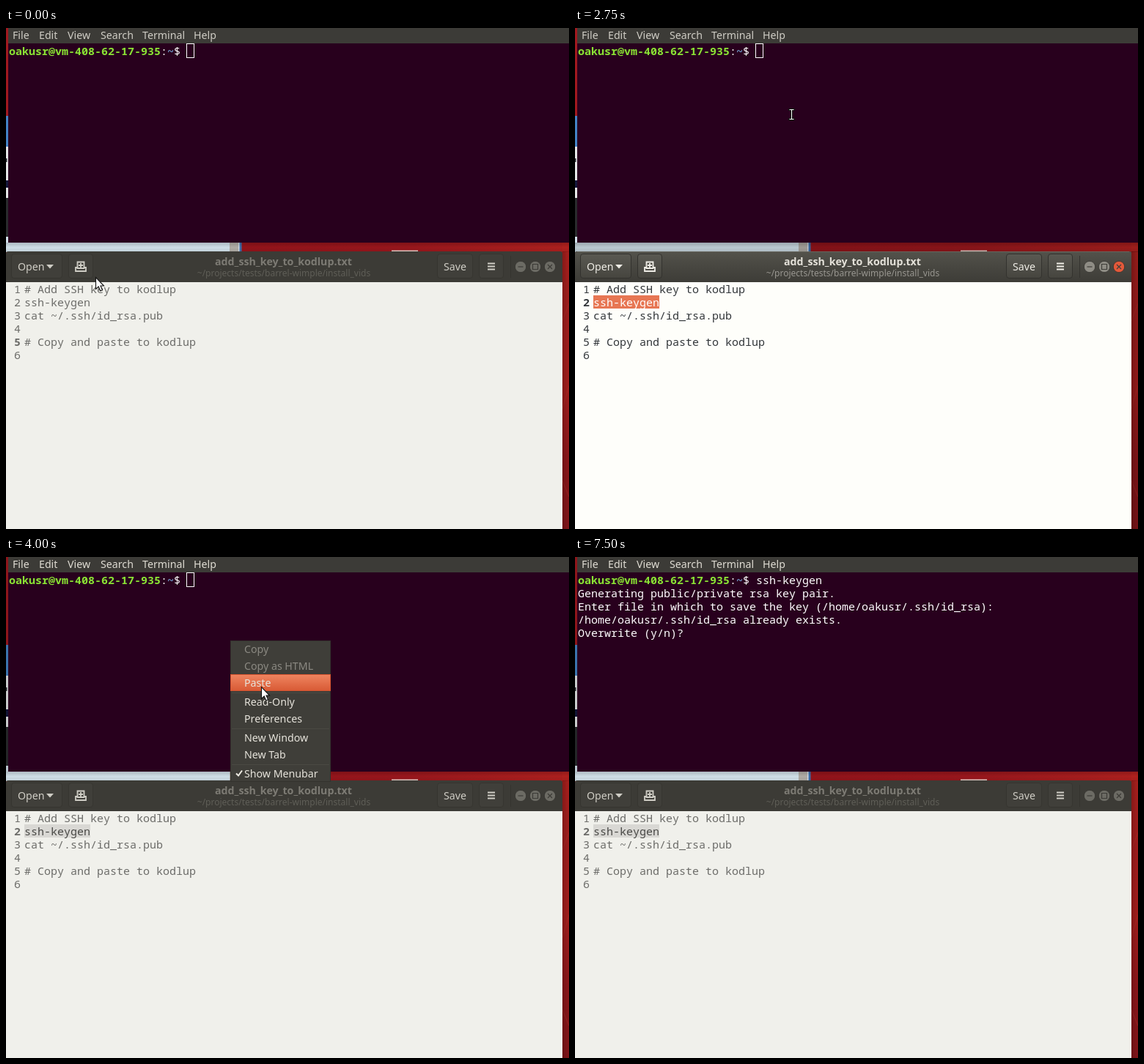
An HTML page for the animation above (8000 ms loop, 768x684 px).

```html
<!DOCTYPE html>
<html lang="en">
<head>
<meta charset="utf-8">
<title>Key setup</title>
<style>
  html, body { margin: 0; width: 100%; height: 100%; overflow: hidden; background: #a0191f; }
  svg { display: block; width: 768px; height: 684px; }
  text { white-space: pre; }
  .ui { font: 14.2px "Noto Sans", "Open Sans", sans-serif; }
  .mono { font: 15px "Noto Sans Mono", "DejaVu Sans Mono", monospace; }
  .b { font-weight: bold; }
  .mid { text-anchor: middle; }
</style>
</head>
<body>
<svg id="stage" viewBox="0 0 768 684" xmlns="http://www.w3.org/2000/svg"></svg>
<script>
const USER = 'oakusr', HOST = 'vm-408-62-17-935', SITE = 'kodlup';
const LOOP = 8000;

const rect = (x, y, w, h, fill, more = '') =>
  `<rect x="${x}" y="${y}" width="${w}" height="${h}" fill="${fill}" ${more}/>`;
const text = (x, y, str, fill, cls = 'ui', more = '') =>
  `<text x="${x}" y="${y}" fill="${fill}" class="${cls}" ${more}>${str}</text>`;
const line = (d, color, w = 1, more = '') =>
  `<path d="${d}" fill="none" stroke="${color}" stroke-width="${w}" ${more}/>`;
const group = (id, body) => `<g id="${id}">${body}</g>`;
const grad = (id, dir, ...stops) => `<linearGradient id="${id}" ${dir}>` +
  stops.map((c, i) => `<stop offset="${i / (stops.length - 1)}" stop-color="${c}"/>`).join('') +
  '</linearGradient>';
const DOWN = 'x2="0" y2="1"', ACROSS = 'x2="1" y2="0"';

const defs = `<defs>
  ${grad('wall', DOWN, '#b5221f', '#ad1f20', '#b0201f', '#98181d', '#8c161b')}
  ${grad('strip', ACROSS, '#96141b', '#9c171d', '#b1211f')}
  ${grad('side', ACROSS, '#00000040', '#00000010')}
  ${grad('under', DOWN, '#00000030', '#00000008', '#00000018')}
  ${grad('head', DOWN, '#53524b', '#3d3c37')}
  ${grad('btn', DOWN, '#5a5952', '#46453f')}
  ${grad('hot', DOWN, '#ef8560', '#d85a35')}
</defs>`;

function desktop() {
  return rect(0, 0, 768, 684, '#a0191f') +
    rect(321, 293, 447, 13, 'url(#strip)') +
    rect(759, 293, 9, 391, 'url(#wall)') +
    line('M759 400L768 376M759 520L768 488M759 618L768 640', '#c23a31', 1, 'opacity=".4"') +
    rect(0, 120, 3, 42, '#4383c4') + rect(0, 162, 3, 70, '#e4e6e6') +
    rect(0, 178, 1.5, 5, '#33363a') + rect(0, 208, 3, 10, '#15183c') +
    rect(0, 232, 3, 53, '#292b2c') + rect(0, 285, 3, 9, '#d0e0e9') +
    rect(0, 293, 305, 13, '#d4e4ed') + rect(305, 293, 12, 13, '#b4b0a9') +
    rect(317, 293, 2, 13, '#dde5ec') + rect(318.5, 293, 3, 13, '#3f70ad') +
    rect(0, 293, 768, 13, 'url(#under)') + rect(759, 305, 9, 379, 'url(#side)') +
    rect(526, 303.5, 36, 2, '#dcc3bd');
}

function terminal() {
  const menu = { File: 9, Edit: 45, View: 84, Search: 129, Terminal: 186, Help: 256 };
  const row = (n, str) => text(4, 37 + 18 * n, str, '#fff', 'mono');
  return rect(3, 0, 765, 21, '#3c3b37') + rect(3, 21, 765, 272, '#28001d') +
    group('bar', Object.entries(menu).map(([s, x]) => text(x, 15, s, 'currentColor')).join('')) +
    text(4, 37, `<tspan class="b" fill="#8ae234">${USER}@${HOST}</tspan>:` +
      '<tspan class="b" fill="#729fcf">~</tspan>$ <tspan id="cmd">ssh-keygen</tspan>', '#fff', 'mono') +
    group('out1', row(1, 'Generating public/private rsa key pair.')) +
    group('out2', row(2, `Enter file in which to save the key (/home/${USER}/.ssh/id_rsa):`)) +
    group('out3', row(3, `/home/${USER}/.ssh/id_rsa already exists.`) + row(4, 'Overwrite (y/n)?')) +
    '<rect id="block" stroke="#fff"/>';
}

// One editor window, in its active or inactive look.
function editor(on) {
  const ink = on ? '#32363a' : '#6c6c69', label = on ? '#efede6' : '#cfcdc5';
  const page = on ? '#fefefa' : '#f0f0eb';
  const lines = [`# Add SSH key to ${SITE}`, 'ssh-keygen', 'cat ~/.ssh/id_rsa.pub', '',
    `# Copy and paste to ${SITE}`, ''];
  const button = (x, w) => rect(x + .5, 308.5, w - 1, 33, on ? 'url(#btn)' : '#403f3a',
    `rx="3.5" stroke="${on ? '#33322e' : '#363530'}"`);
  const dot = (x, fill, d) => `<circle cx="${x}" cy="326" r="7.7" fill="${fill}" stroke="#33322e" stroke-width=".8"/>` +
    line(d, on ? '#403f3a' : '#3c3b37', 1.2);
  const gray = on ? '#8f8d85' : '#6c6b64';
  return (on ? rect(0, 293, 768, 13, '#000', 'opacity=".1"') + rect(759, 305, 9, 379, '#000', 'opacity=".1"') : '') +
    `<path d="M0 347V308Q0 305 3 305H756Q759 305 759 308V347Z" fill="${on ? 'url(#head)' : '#3c3b36'}"/>` +
    (on ? line('M3 305.5H756', '#66655d') : '') +
    button(7, 70) + button(85, 34) + button(588, 49) + button(645, 34) +
    text(16, 331, 'Open', label) + `<path d="M55 323H65L60 328.5Z" fill="${label}"/>` +
    line('M98 327H95V332H109V327H106M97.5 328V319.5H106.5V328ZM102 321V327M99 324H105', label, 1.8) +
    text(597, 331, 'Save', label) + line('M657 321.5H667M657 325.5H667M657 329.5H667', label, 1.8) +
    line('M688.5 311V341', '#34332f') +
    text(378.5, 324, `add_ssh_key_to_${SITE}.txt`, on ? '#e4e1d9' : '#7d7b74', 'ui b mid') +
    text(379, 339, '~/projects/tests/barrel-wimple/install_vids', on ? '#989690' : '#5f5e57', 'ui mid', 'style="font-size:12px"') +
    dot(702, gray, 'M698.5 326H705.5') + dot(722, gray, 'M718.5 322.5H725.5V329.5H718.5Z') +
    dot(742, on ? '#e5593a' : gray, 'M739 323L745 329M745 323L739 329') +
    rect(0, 347, 759, 337, page) +
    rect(25, 365, 90, 18, on ? '#e77653' : '#d9d8d4', 'class="sel"') +
    lines.map((s, i) => {
      const y = 362 + 18 * i;
      return text(11, y, i + 1, ink, 'mono num') +
        text(25, y, s, ink, 'mono' + (i === 1 ? ' pick' : ''));
    }).join('');
}

function popup() {
  const items = [['Copy', 126], ['Copy as HTML', 149], ['Paste', 172], ['Read-Only', 198],
    ['Preferences', 221], ['New Window', 247], ['New Tab', 270], ['Show Menubar', 296]];
  return rect(306.5, 114.5, 136, 192, '#3f3e39', 'stroke="#33322d"') +
    line('M308 185.5H441M308 234.5H441M308 283.5H441', '#4a4943') +
    rect(306.5, 160.5, 136, 22, 'url(#hot)', 'id="hot" stroke="#d4532f"') +
    items.map(([s, y], i) => text(325, y + 5, s, i < 2 ? '#8b8982' : '#e6e3db')).join('') +
    line('M314 295.5L317 298.5L322 291.5', '#eeebe3', 2);
}

const BEAM = 'M-3 -6.5H3M0 -6.5V6.5M-3 6.5H3';
const pointers =
  group('arrow', '<path d="M.5 .5V16.5L4.2 13L6.8 19L9.5 17.8L7 12H11.5Z" fill="#fff" stroke="#111" stroke-width="1.1"/>') +
  group('beam', line(BEAM, '#111', 3, 'stroke-linecap="square"') + line(BEAM, '#fff', 1));

const $ = id => document.getElementById(id);
$('stage').innerHTML = defs + desktop() + group('term', terminal()) +
  rect(0, 0, 3, 293, '#000', 'id="shade" opacity=".12"') +
  group('idle', editor(false)) + group('live', editor(true)) +
  rect(0, 0, 1, 18, '#333', 'id="caret"') + group('popup', popup()) + pointers;

// Each step changes only the listed values.
const steps = [
  [0, { focus: 0, row: 5, sel: 0, caret: null, arrow: [122, 340], beam: null,
        block: [27, 0], fill: 0, menu: 0, hot: 0, cmd: 0, out: 0, term: 0 }],
  [130, { arrow: null, beam: [124, 358] }],
  [810, { beam: [112, 362] }],
  [900, { beam: [90, 371] }],
  [1000, { beam: [77.5, 376] }],
  [1380, { caret: [259, 419] }],
  [1440, { focus: .6 }],
  [1560, { focus: 1, row: 2, caret: [79, 365] }],
  [2000, { sel: 1, caret: null }],
  [2560, { beam: [84, 385] }],
  [2650, { beam: [206, 222] }],
  [2750, { beam: [295.5, 118] }],
  [3060, { focus: .6, term: 1, fill: 1 }],
  [3120, { focus: .25, beam: [303, 116] }],
  [3190, { focus: 0, beam: [309.5, 114.5] }],
  [3500, { beam: null, arrow: [304.5, 112] }],
  [3810, { menu: 1, fill: 0 }],
  [3900, { arrow: [328, 146] }],
  [4000, { arrow: [348, 177], hot: 1 }],
  [4630, { menu: 0, fill: 1, arrow: null, beam: [349.5, 179.5] }],
  [5000, { cmd: 1, block: [37, 0] }],
  [5120, { beam: null }],
  [5560, { out: 1, block: [0, 2] }],
  [5880, { out: 2, block: null }],
  [6500, { block: [64, 2] }],
  [7500, { out: 3, block: null }]
];

const show = (el, on) => { el.style.display = on ? '' : 'none'; };
function place(id, pos) {
  show($(id), pos);
  if (pos) $(id).setAttribute('transform', `translate(${pos})`);
}
const windows = ['idle', 'live'].map(id => ({
  sel: $(id).querySelector('.sel'), pick: $(id).querySelector('.pick'), nums: [...$(id).querySelectorAll('.num')]
}));

function draw(s) {
  $('live').style.opacity = s.focus;
  windows.forEach((w, k) => {
    show(w.sel, s.sel);
    w.pick.style.fill = s.sel ? (k ? '#fff' : '#484845') : '';
    w.nums.forEach((n, i) => n.classList.toggle('b', i + 1 === s.row));
  });
  $('bar').style.color = s.term ? '#dfdcd3' : '#cfcdc5';
  show($('shade'), s.term);
  show($('cmd'), s.cmd);
  for (let i = 1; i < 4; i++) show($('out' + i), s.out >= i);
  show($('popup'), s.menu);
  show($('hot'), s.hot);
  place('caret', s.caret);
  place('arrow', s.arrow);
  place('beam', s.beam);

  const block = $('block');
  show(block, s.block);
  if (s.block) {
    const [col, row] = s.block;
    const grow = s.fill ? 0 : 1;
    const box = { x: 4.5 + 9 * col - grow, y: 22.5 + 18 * row - grow,
      width: 8 + 2 * grow, height: 17 + 2 * grow, fill: s.fill ? '#fff' : 'none' };
    for (const k in box) block.setAttribute(k, box[k]);
  }
}

const start = performance.now();
let last = -1;
function tick(now) {
  const t = Math.max(0, now - start) % LOOP;
  const past = steps.filter(([at]) => at <= t);
  if (past.length !== last) {
    last = past.length;
    draw(Object.assign({}, ...past.map(p => p[1])));
  }
  requestAnimationFrame(tick);
}
tick(start);
</script>
</body>
</html>
```
